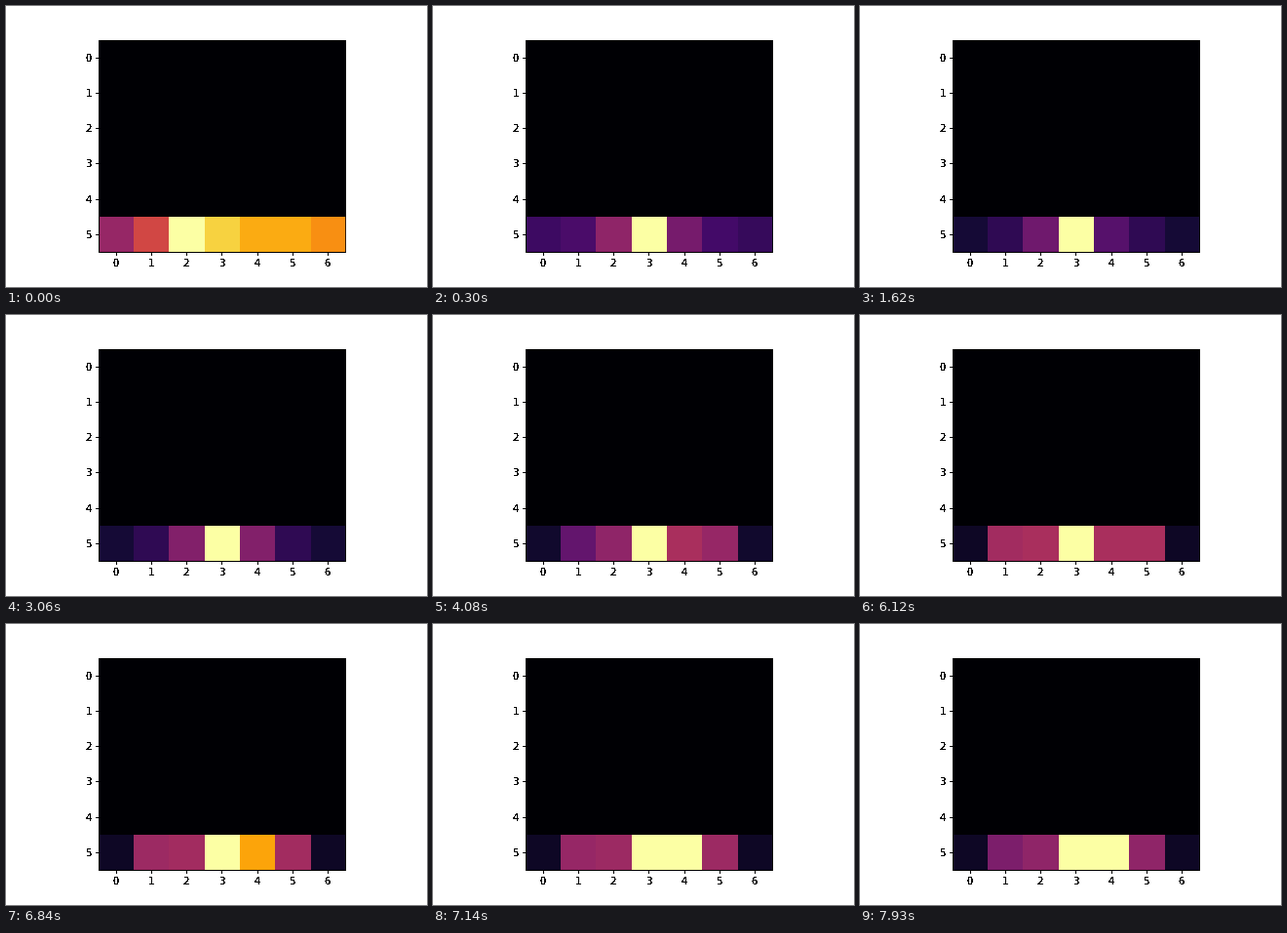
An HTML page that plays this animation: 432 by 288 pixels, repeating every 8000 ms.

```html
<!DOCTYPE html>
<html lang="en">
<head>
<meta charset="utf-8">
<title>Heatmap</title>
<style>
  html, body { margin: 0; width: 100%; height: 100%; overflow: hidden; background: #fff; }
  svg { display: block; width: 432px; height: 288px; }
  text { font: 10px "DejaVu Sans", sans-serif; }
</style>
</head>
<body>
<svg viewBox="0 0 432 288">
  <filter id="crisp">
    <feComponentTransfer><feFuncA type="discrete" tableValues="0 1 1 1"/></feComponentTransfer>
  </filter>
  <rect x="95" y="35" width="254" height="218"/>
  <rect x="96" y="36" width="252" height="216" fill="#000004"/>
  <g id="cells" shape-rendering="crispEdges"></g>
  <rect x="348" y="35" width="1" height="218" fill-opacity=".8"/>
  <g id="ticks"></g>
  <g id="labels" filter="url(#crisp)"></g>
</svg>
<script>
const LOOP = 8000, TICK = 60;
const LEFT = 94.56, TOP = 34.56, SIZE = 36.24;
const DIGIT = 6.36;
const LEVELS = 64;

// Colour map, evenly spaced from 0 to 1.
const STOPS = ["#000004", "#160b39", "#420a68", "#6a176e", "#932667", "#bc3754",
  "#dd513a", "#f37819", "#fca50a", "#f6d746", "#fcffa4"];

// The first moments fade through three poses.
const START = [.4, .56, 1, .89, .82, .82, .75];
const PEAK = [.19, .22, .39, 1, .33, .21, .17];
const SETTLED = [.1, .155, .28, 1, .25, .155, .1];

// Later drifts: cell, from, to, amount.
const DRIFTS = [
  [0, 600, 7920, -.04],
  [6, 600, 7920, -.04],
  [2, 600, 6120, .17],
  [4, 1800, 4080, .21],
  [5, 3660, 4080, .25],
  [1, 3660, 4560, .285],
  [5, 4080, 4920, .05],
  [4, 6420, 7080, .54],
  [1, 6600, 7920, -.1],
  [2, 6600, 7920, -.06],
  [5, 6600, 7920, -.065]
];

const progress = (t, from, to) => Math.min(Math.max((t - from) / (to - from), 0), 1);
const blend = (a, b, p) => a.map((v, i) => v * (b[i] / v) ** p);

function valuesAt(time) {
  const t = Math.floor(time / TICK) * TICK;
  const values = t < 300
    ? blend(START, PEAK, progress(t, 0, 300))
    : blend(PEAK, SETTLED, progress(t, 300, 540));
  for (const [cell, from, to, amount] of DRIFTS) values[cell] += amount * progress(t, from, to);
  return values.map(v => Math.round(v * LEVELS) / LEVELS);
}

function colour(v) {
  const x = v * (STOPS.length - 1);
  const i = Math.min(Math.floor(x), STOPS.length - 2);
  return `color-mix(in srgb, ${STOPS[i]}, ${STOPS[i + 1]} ${(x - i) * 100}%)`;
}

function add(parent, tag, attrs, text = "") {
  const el = document.createElementNS("http://www.w3.org/2000/svg", tag);
  for (const name in attrs) el.setAttribute(name, attrs[name]);
  el.textContent = text;
  document.getElementById(parent).append(el);
  return el;
}

const edge = i => i ? Math.round(94.9 + 254 * i / 7) : 96;
const cells = START.map((_, i) => add("cells", "rect", {
  x: edge(i), y: 216, width: edge(i + 1) - edge(i), height: 36
}));

for (let i = 0; i < 7; i++) {
  const x = LEFT + SIZE * (i + .5);
  add("ticks", "rect", { x: Math.round(x), y: 253, width: 1, height: 3 });
  add("labels", "text", { x: Math.ceil(x - DIGIT / 2), y: 267 }, i);
}
for (let i = 0; i < 6; i++) {
  const y = Math.round(TOP + SIZE * (i + .5));
  add("ticks", "rect", { x: 92, y, width: 3, height: 1 });
  add("labels", "text", { x: 82, y: y + 4 }, i);
}

function draw() {
  const values = valuesAt(performance.now() % LOOP);
  cells.forEach((cell, i) => { cell.style.fill = colour(values[i]); });
  requestAnimationFrame(draw);
}
draw();
</script>
</body>
</html>
```
